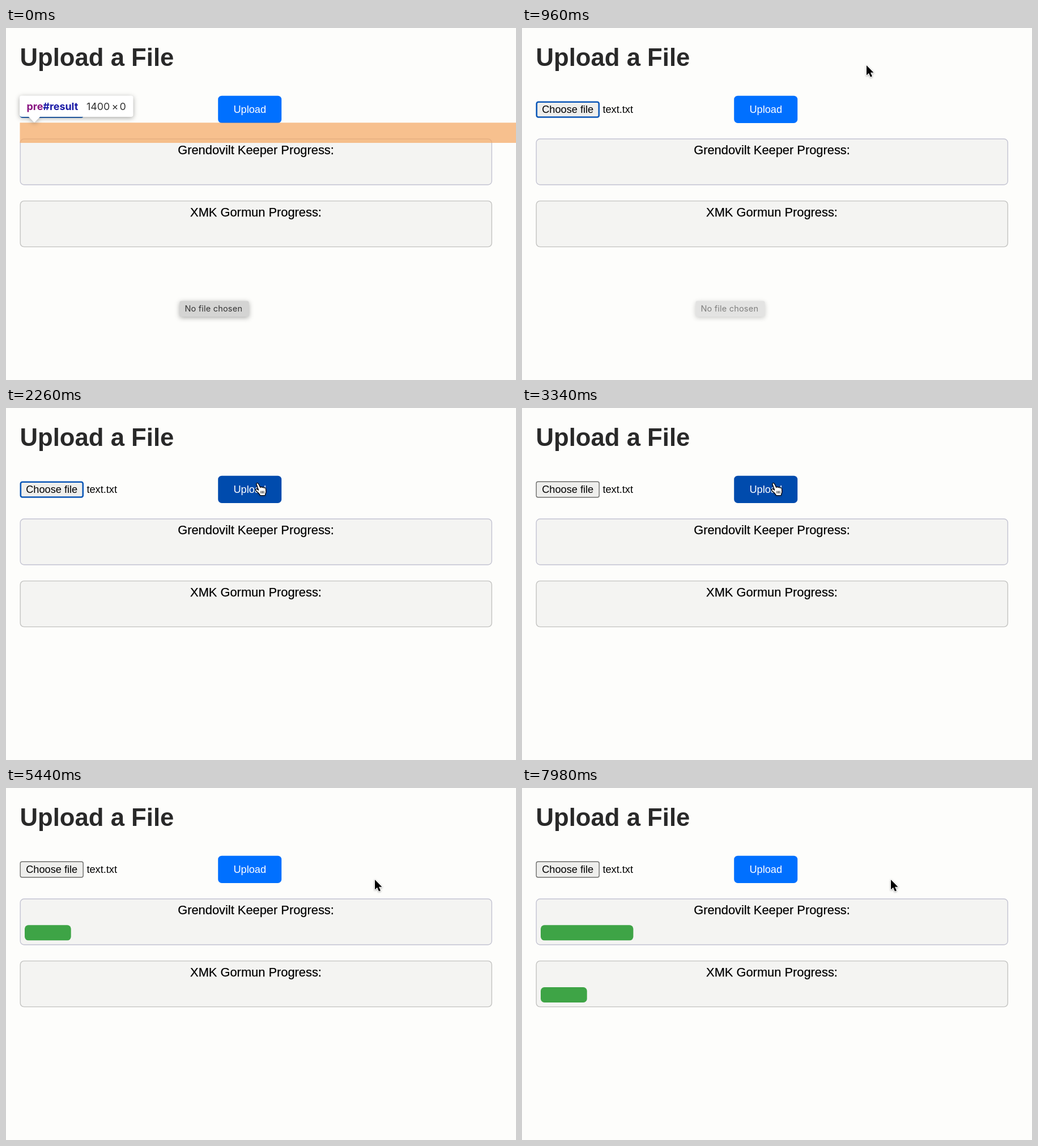
An HTML page for the animation above (8000 ms loop, 900 by 622 pixels).

```html
<!DOCTYPE html>
<html lang="en">
<head>
<meta charset="utf-8">
<title>Upload a File</title>
<style>
  html, body { margin: 0; width: 100%; height: 100%; overflow: hidden; background: #fdfdfb; }
  svg { display: block; width: 900px; height: 622px; font-family: "Liberation Sans", Arial, sans-serif; }
  .control { font-size: 18.2px; }
  .label { font-size: 21.85px; text-anchor: middle; stroke: #000; stroke-width: .25; }
  .panel { fill: #f4f4f2; stroke: #c3c3c1; stroke-width: 1.4; }
  .bar { fill: #3ea446; }
  .tip { font-family: Inter, sans-serif; }
  .shadow { filter: drop-shadow(0 2px 4px #0005); }
  #pointer { filter: drop-shadow(0 1.5px 1.5px #0005); }
</style>
</head>
<body>
<svg viewBox="0 0 900 622">
  <text x="24.5" y="67" font-size="43.7" font-weight="bold" fill="#292929">Upload a File</text>

  <g class="control">
    <rect id="choose" fill="#eeeeec"/>
    <text x="35.2" y="150">Choose file</text>
    <text x="142.4" y="150">text.txt</text>
    <rect id="upload" x="374.2" y="119.700" width="112" height="48.300" rx="6.500"/>
    <text x="430.300" y="150" fill="#fff" text-anchor="middle">Upload</text>
  </g>

  <rect class="panel" x="25.2" y="196" width="832" height="81" rx="6.5" style="stroke:#c4c4d2"/>
  <text class="label" x="441" y="223">Grendovilt Keeper Progress:</text>
  <rect class="bar" id="firstBar" x="33" y="242.3" height="27" rx="6.5"/>

  <rect class="panel" x="25.2" y="305.6" width="832" height="81" rx="6.5"/>
  <text class="label" x="441" y="332.7">XMK Gormun Progress:</text>
  <rect class="bar" id="secondBar" x="33" y="352" height="27" rx="6.5"/>

  <g id="inspector" class="tip" font-size="17.9">
    <rect x="24.5" y="167.3" width="876" height="35.7" fill="#f6aa64" opacity=".72"/>
    <path class="shadow" fill="#fff"
      d="M28 119.5H220.5a4 4 0 0 1 4 4V153a4 4 0 0 1-4 4H60L50 167 40 157H28a4 4 0 0 1-4-4V123.5a4 4 0 0 1 4-4Z"/>
    <text x="36.5" y="145" font-weight="bold" fill="#881280">pre<tspan fill="#1a1aa6">#result</tspan></text>
    <g fill="#333"><text x="142" y="145">1400</text><text x="186.5" y="145">×</text><text x="200.5" y="145">0</text></g>
  </g>

  <g id="fileTip" class="tip">
    <rect class="shadow" x="306.5" y="482.5" width="122" height="27.5" rx="2.5" fill="#d4d4d3"/>
    <text x="315.5" y="501" font-size="14.5" letter-spacing=".2" fill="#333">No file chosen</text>
  </g>

  <g id="pointer" stroke-linejoin="round">
    <path id="arrow" d="M0 0V17.5L4 13.8 7 20.5 10 19.2 7 12.7H12.5Z" stroke="#fff" stroke-width="2" paint-order="stroke"/>
    <g id="hand" transform="translate(-1.5 0)" fill="#fff" stroke="#000" stroke-width="1.2">
      <path d="M1 4C-1 1 2.5-.5 4 2L7.3 8.6C8 6.8 10 7 10.5 8.5 11.5 7.3 13.3 7.700 13.700 9.300 15 8.300 16.700 9 17 11L17.300 16C17.300 18 16 19 15.600 22.500H7C6.500 19.500 1.500 16.500-.8 13.300-2 11.300 .5 10.300 2 11.700L4.200 13.200Z"/>
      <path d="M8.5 14.5V19M11 14.5V19M13.5 14.5V19" fill="none" stroke-width="1"/>
    </g>
  </g>
</svg>
<script>
  const LOOP = 8000;
  const BAR_STEP = 81.7;
  const ids = ["choose", "upload", "firstBar", "secondBar", "inspector", "fileTip", "pointer", "arrow", "hand"];
  const el = Object.fromEntries(ids.map(id => [id, document.getElementById(id)]));

  // Pointer stops: time, x, y
  const route = [
    [540, 912, 50], [960, 608, 66], [1580, 550, 100], [2040, 443, 132],
    [3460, 443, 132], [3900, 651, 162]
  ];

  const clamp = v => Math.min(1, Math.max(0, v));
  const smooth = v => v * v * (3 - 2 * v);
  const set = (node, attrs) => {
    for (const name in attrs) node.setAttribute(name, attrs[name]);
  };
  const show = (node, visible) => set(node, { visibility: visible ? "visible" : "hidden" });

  function pointerAt(t) {
    let [, x, y] = route[0];
    for (let i = 1; i < route.length; i++) {
      const [start, x0, y0] = route[i - 1];
      const [end, x1, y1] = route[i];
      if (t < start) break;
      const k = smooth(clamp((t - start) / (end - start)));
      x = x0 + (x1 - x0) * k;
      y = y0 + (y1 - y0) * k;
    }
    return [x, y];
  }

  function render(t) {
    const [x, y] = pointerAt(t);
    const hover = x > 374 && x < 486 && y > 120 && y < 168;
    const focused = t < 2900;

    set(el.pointer, { transform: `translate(${x} ${y})` });
    show(el.arrow, !hover);
    show(el.hand, hover);
    set(el.upload, { fill: hover ? "#004bad" : "#0070ff" });
    set(el.choose, focused
      ? { x: 25.8, y: 130.7, width: 110, height: 26.8, rx: 3, stroke: "#0b57b7", "stroke-width": 2.6 }
      : { x: 25.2, y: 130.2, width: 111, height: 27.6, rx: 3, stroke: "#6c6c6a", "stroke-width": 1.4 });

    show(el.inspector, t < 540);
    set(el.fileTip, { opacity: 1 - clamp((t - 520) / 1160) });
    set(el.firstBar, { width: BAR_STEP * ((t >= 5100) + (t >= 7000)) });
    set(el.secondBar, { width: BAR_STEP * (t >= 6500) });
  }

  function tick() {
    render(performance.now() % LOOP);
    requestAnimationFrame(tick);
  }
  tick();
</script>
</body>
</html>
```
